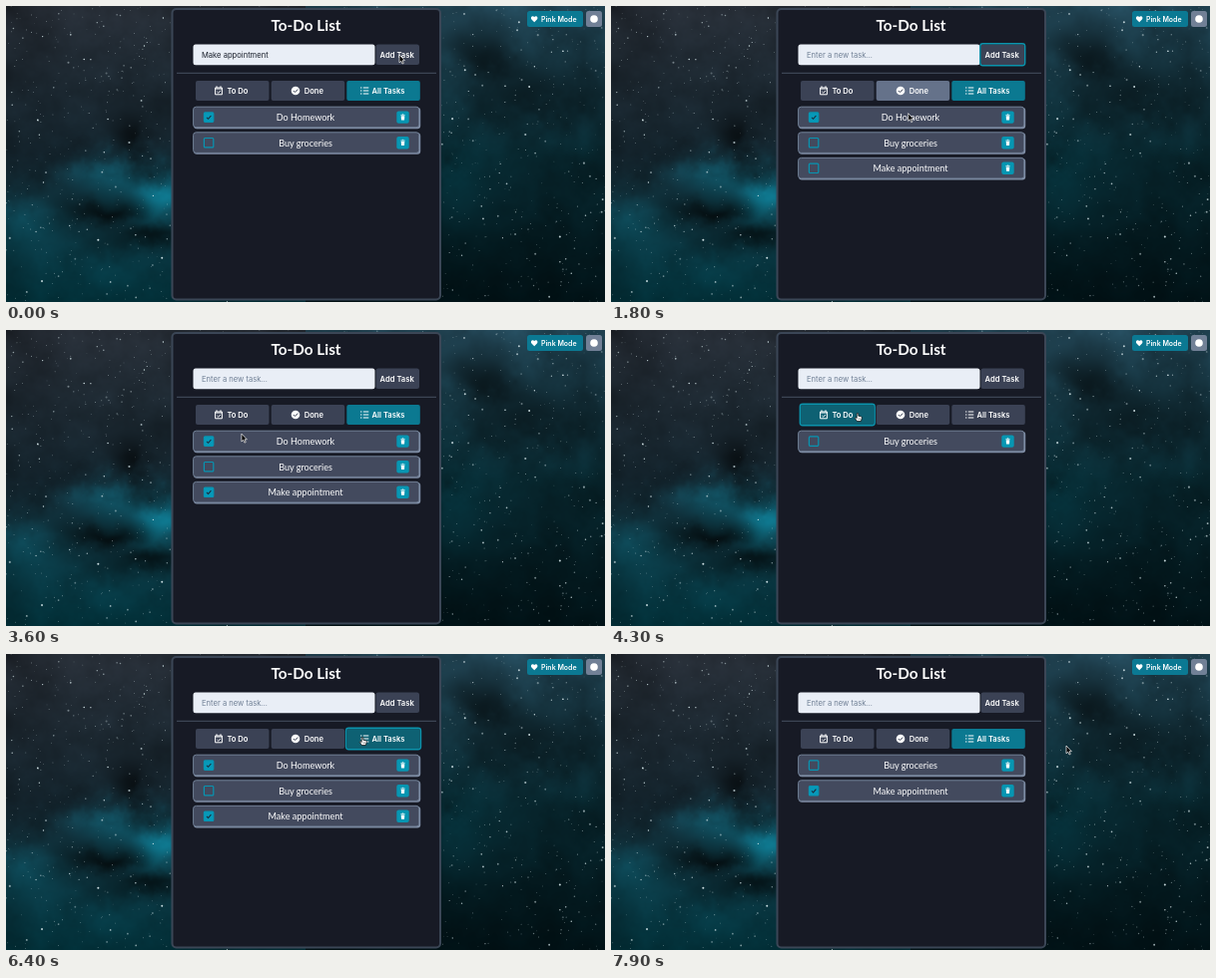
An HTML page with a canvas that plays this animation: 600x297 px, repeating every 8 s.

```html
<!DOCTYPE html>
<html lang="en">
<head>
<meta charset="utf-8">
<title>To-Do List</title>
<style>
  html, body { margin: 0; width: 100%; height: 100%; overflow: hidden; background: #050c10; }
  canvas, svg { position: absolute; left: 0; top: 0; width: 600px; height: 297px; }
  text { font: 7.6px Inter, sans-serif; fill: #fff; }
  .bold { font-weight: 600; }
  .small { font-size: 7px; }
  .title { font: bold 15.3px Lato, sans-serif; text-anchor: middle; }
  .task { font: 9.05px Lato, sans-serif; text-anchor: middle; }
  .line { fill: none; stroke: #fff; stroke-width: 1; }
</style>
</head>
<body>
<canvas id="sky" width="600" height="297"></canvas>
<svg viewBox="0 0 600 297">
  <rect x="166.5" y="3" width="268.5" height="291.5" rx="4" fill="#171a25" stroke="#3b4656" stroke-width="2"/>
  <text class="title" x="300.5" y="24.6">To-Do List</text>
  <path d="M171 67.3H431" stroke="#465062"/>
  <rect x="522" y="5" width="56" height="16" rx="2.5" fill="#0b7993"/>
  <path d="M529.2 16.3L526.5 13.5C524.7 11.3 527.6 8.9 529.2 11C530.8 8.9 533.7 11.3 531.9 13.5Z" fill="#fff"/>
  <text class="bold small" x="536" y="15.6">Pink Mode</text>
  <rect x="581" y="5" width="16" height="16" rx="2.5" fill="#718096"/>
  <circle cx="589" cy="13" r="3.8" fill="#fff"/>
  <g id="app"></g>
  <g id="cursor"></g>
</svg>
<script>
const $ = id => document.getElementById(id);
const LOOP = 8000;
const AT = { press: 1050, add: 1200, check: 2800, todo: 4100, done: 4950, all: 5900, remove: 7250 };

// Pointer path: time, x, y
const PATH = [
  [-200, 394, 64], [0, 394, 49], [300, 392, 50], [1300, 392, 50], [2300, 204, 165], [3000, 204, 165],
  [3900, 247, 83], [4350, 247, 83], [4800, 306, 84], [5100, 306, 84], [5300, 341, 83],
  [5700, 357, 83], [6500, 357, 83], [7050, 397, 109], [7350, 397, 109], [7900, 456, 92]
];
const ADD = { x: 370.5, y: 38.5, w: 43.5, h: 20.5 };
const TABS = [
  { id: 'todo', label: 'To Do', x: 190, textX: 221.4,
    icon: '<path class="line" d="M209.6 82H216.4V88.8H209.6ZM211 80.3V82M215 80.3V82M209.6 83H216.4M211.4 86L212.6 87.2L214.9 84.9"/>' },
  { id: 'done', label: 'Done', x: 265.7, textX: 298.7,
    icon: '<circle cx="290" cy="85" r="4.3" fill="#fff"/><path d="M288 85L289.5 86.5L292.2 83.6" fill="none" stroke="#3b4255"/>' },
  { id: 'all', label: 'All Tasks', x: 341.3, textX: 366.5,
    icon: '<path class="line" d="M357.8 82H363.3M357.8 85H363.3M357.8 88H363.3M355 82H356.4M355 85H356.4M355 88H356.4"/>' }
].map(tab => ({ ...tab, y: 75, w: 73.5, h: 20 }));

function pointer(t) {
  const i = PATH.findIndex(p => p[0] > t);
  if (i < 0) return PATH.at(-1).slice(1);
  const [t0, x0, y0] = PATH[i - 1], [t1, x1, y1] = PATH[i];
  const u = (t - t0) / (t1 - t0), e = u * u * (3 - 2 * u);
  return [x0 + (x1 - x0) * e, y0 + (y1 - y0) * e];
}

const inside = ([x, y], b) => x >= b.x && x <= b.x + b.w && y >= b.y && y <= b.y + b.h;

const box = (b, fill, rx = 2, extra = '') =>
  `<rect x="${b.x}" y="${b.y}" width="${b.w}" height="${b.h}" rx="${rx}" fill="${fill}" ${extra}/>`;

const ring = b => box({ x: b.x - .7, y: b.y - .7, w: b.w + 1.4, h: b.h + 1.4 }, 'none', 2.7,
  'stroke="#0b93ac" stroke-width="1.4"');

function visibleTasks(t, filter) {
  const tasks = [
    { name: 'Do Homework', done: true, shown: t < AT.remove },
    { name: 'Buy groceries', done: false, shown: true },
    { name: 'Make appointment', done: t >= AT.check, shown: t >= AT.add }
  ];
  return tasks.filter(k => k.shown && (filter === 'all' || k.done === (filter === 'done')));
}

const checkBox = i => ({ x: 198.4, y: 106.9 + i * 25.6, w: 9.4, h: 9.4 });
const trashBox = i => ({ x: 391.3, y: 105.4 + i * 25.6, w: 12.4, h: 12.4 });

function row(task, i) {
  const y = 101.5 + i * 25.6;
  const tick = `<path d="M201 ${y + 10.3}L202.6 ${y + 11.8}L205.4 ${y + 8.5}" fill="none" stroke="#1a2b3b" stroke-width="1.1"/>`;
  return box({ x: 188, y: y + .2, w: 227.2, h: 21.5 }, '#8290a8', 3.2) +
    box({ x: 187.6, y: y - .3, w: 226.2, h: 20.6 }, '#434a5e', 2.8, 'stroke="#718096"') +
    box(checkBox(i), task.done ? '#0799b9' : 'none', 1, 'stroke="#0795b2" stroke-width="1.2"') +
    (task.done ? tick : '') +
    `<text class="task" x="300" y="${y + 13.4}">${task.name}</text>` +
    box(trashBox(i), '#0796b2') +
    `<path d="M395.4 ${y + 7.9}H399.6M396.8 ${y + 7.2}H398.2" stroke="#fff" stroke-width=".7"/>` +
    `<path d="M395.7 ${y + 8.7}H399.3L399 ${y + 13}H396Z" fill="#fff"/>`;
}

function view(t, filter, tasks) {
  const hoverAt = pointer(t - 150);
  const typed = t < AT.add;
  const input = box({ x: 187.5, y: 38.5, w: 182, h: 20.8 }, '#e9eef6', 2.5) +
    `<text x="196" y="51.8" style="fill:${typed ? '#1a202c' : '#718096'}">${typed ? 'Make appointment' : 'Enter a new task...'}</text>`;
  const add = box(ADD, inside(hoverAt, ADD) ? '#718096' : '#3b4255', 2.5) +
    (t >= AT.press && t < AT.check ? ring(ADD) : '') +
    '<text class="bold" x="374.6" y="51.5">Add Task</text>';
  const tabs = TABS.map(tab => {
    const active = tab.id === filter, hover = inside(hoverAt, tab);
    const fill = active ? (hover ? '#0e6173' : '#0b7991') : (hover ? '#65728a' : '#3b4255');
    const focus = active && t >= AT.todo && t < AT.remove;
    return box(tab, fill) + (focus ? ring(tab) : '') + tab.icon +
      `<text class="bold" x="${tab.textX}" y="87.8">${tab.label}</text>`;
  });
  return input + add + tabs.join('') + tasks.map(row).join('');
}

const ARROW = '<path d="M0 0V7.8L1.8 6.2L3 9L4.3 8.4L3.1 5.7H5.4Z" fill="#000" stroke="#fff" stroke-width=".7"/>';
const HAND = '<path d="M-.8 .8Q0 -.5 .8 .8V3.2L3.5 3.8Q4.4 4.2 4.2 5.6L3.4 8.6H-.5L-2.7 5.4Q-2.6 4.2 -.8 5.4Z" fill="#fff" stroke="#000" stroke-width=".7"/>' +
  '<path d="M1 5.5V7.2M2.3 5.5V7.2" stroke="#000" stroke-width=".4"/>';

let shown = '';
function frame(now) {
  const t = now % LOOP;
  const filter = t < AT.todo || t >= AT.all ? 'all' : t < AT.done ? 'todo' : 'done';
  const tasks = visibleTasks(t, filter);
  const html = view(t, filter, tasks);
  if (html !== shown) $('app').innerHTML = shown = html;

  const p = pointer(t);
  const targets = [ADD, ...TABS, ...tasks.flatMap((_, i) => [checkBox(i), trashBox(i)])];
  const hand = t >= 100 && targets.some(b => inside(p, b)) && Math.abs(p[0] - 341) > .5;
  $('cursor').innerHTML = hand ? HAND : ARROW;
  $('cursor').setAttribute('transform', `translate(${p})`);
  requestAnimationFrame(frame);
}

// Night sky: a vertical gradient on each side (top, middle, bottom) under noisy clouds
const LEFT = [[35, 41, 49], [20, 36, 45], [2, 44, 52]];
const RIGHT = [[32, 65, 80], [7, 36, 43], [1, 17, 21]];
// Clouds: x, y, width, height, strength (below zero is dark)
const CLOUDS = [
  [158, 190, 30, 28, .95], [105, 168, 42, 22, .5], [18, 222, 45, 30, .28], [90, 270, 80, 30, .12],
  [100, 205, 38, 12, -.6], [150, 236, 34, 13, -.6], [122, 125, 15, 18, -.5],
  [475, 45, 32, 20, -.45], [530, 90, 50, 28, -.4], [455, 175, 32, 55, .15]
];
const mix = (a, b, u) => a + (b - a) * u;
const ease = u => u * u * (3 - 2 * u);
const hash = (x, y) => {
  const v = Math.sin(x * 127.1 + y * 311.7) * 43758.5453;
  return v - Math.floor(v);
};
function noise(x, y) {
  const i = Math.floor(x), j = Math.floor(y), u = ease(x - i), v = ease(y - j);
  return mix(mix(hash(i, j), hash(i + 1, j), u), mix(hash(i, j + 1), hash(i + 1, j + 1), u), v);
}
function fbm(x, y) {
  let sum = 0;
  for (let k = 0; k < 5; k++) sum += noise(x * 2 ** k, y * 2 ** k) / 2 ** (k + 1);
  return sum;
}
function skyColor(x, y) {
  const side = x < 300 ? LEFT : RIGHT, h = y / 148.5, k = Math.min(1, Math.floor(h));
  const n = fbm(x / 34, y / 34) - .48;
  const wx = x + 30 * n, wy = y + 40 * n;
  let glow = 0, shade = 1 + .7 * n;
  for (const [cx, cy, w, t, s] of CLOUDS) {
    const a = s * Math.exp(-(((wx - cx) / w) ** 2) - ((wy - cy) / t) ** 2);
    if (a > 0) glow += a; else shade *= 1 + a;
  }
  return [0, 85, 100].map((tint, c) => (mix(side[k][c], side[k + 1][c], h - k) + tint * glow) * shade);
}
function paintSky() {
  const g = $('sky').getContext('2d'), img = g.createImageData(600, 297);
  for (let y = 0, o = 0; y < 297; y++)
    for (let x = 0; x < 600; x++, o += 4) img.data.set([...skyColor(x, y), 255], o);
  g.putImageData(img, 0, 0);
  g.fillStyle = '#dcecef';
  for (let i = 0; i < 1500; i++) {
    g.globalAlpha = .25 + .7 * hash(i, 4);
    g.beginPath();
    g.arc(600 * hash(i, 1), 297 * hash(i, 2), .35 + .75 * hash(i, 3) ** 5, 0, 7);
    g.fill();
  }
}

paintSky();
requestAnimationFrame(frame);
</script>
</body>
</html>
```
